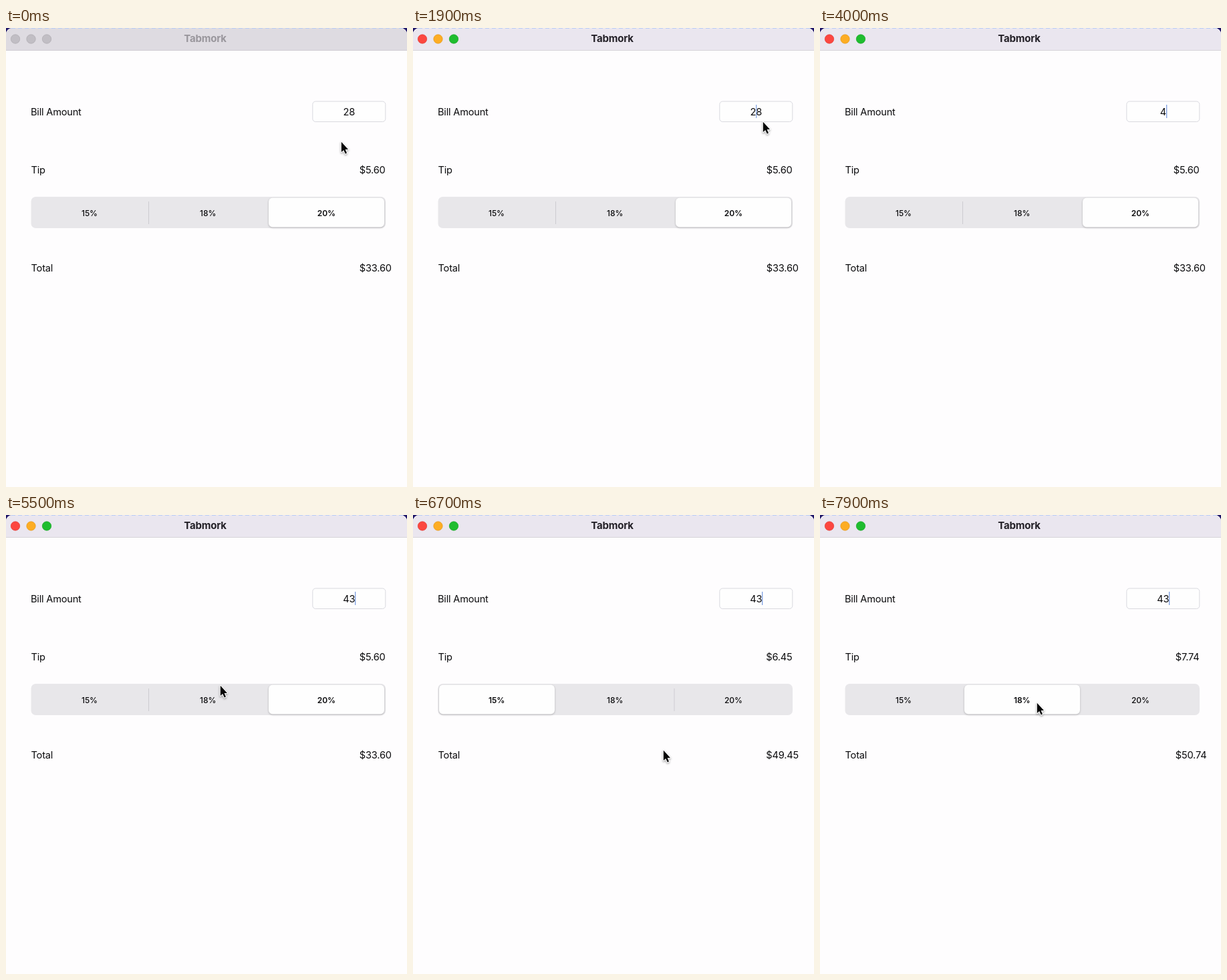
These frames come from a looping animation (600 px wide and 688 px high, 8000 ms). An HTML page with a canvas:

```html
<!DOCTYPE html>
<html lang="en">
<head>
<meta charset="utf-8">
<title>Tip calculator</title>
<style>
  html, body { margin: 0; width: 100%; height: 100%; overflow: hidden; background: #fefdfe; }
  canvas { display: block; width: 600px; height: 688px; }
</style>
</head>
<body>
<canvas id="stage" width="600" height="688"></canvas>
<script>
const ctx = document.getElementById('stage').getContext('2d');
const LOOP = 8000, STEP = 100;
const SANS = 'Inter, "Open Sans", sans-serif';
const RATES = [15, 18, 20];

// time, x, y of the pointer tip
const PATH = [
  [0, 501, 170], [500, 513, 131], [900, 514, 130], [1100, 522, 194], [1400, 523, 140],
  [4800, 523, 140], [5500, 320, 255], [5600, 282, 255], [5900, 142, 288], [6100, 136, 290],
  [6400, 136, 290], [6700, 374, 352], [6900, 374, 352], [7300, 324, 281]
];
// time, text in the field, caret index
const TYPING = [
  [0, '28', -1], [800, '28', 1], [3200, '28', 2], [3400, '2', 1],
  [3600, '', 0], [3900, '4', 1], [4400, '43', 2]
];
// time, bill, chosen segment
const PICKS = [[0, 28, 2], [6000, 43, 0], [7500, 43, 1]];
const ACTIVE_AT = 500, SLIDE = 390;
const HIDE_FROM = 3200, HIDE_TO = 4800;

const clamp = v => Math.max(0, Math.min(1, v));
const smooth = v => { v = clamp(v); return v * v * (3 - 2 * v); };
const mix = (a, b, k) => a + (b - a) * k;
const lastIndex = (list, t) => list.reduce((n, row, i) => row[0] <= t ? i : n, 0);
const money = v => '$' + v.toFixed(2);

function box(x, y, w, h, r, fill) {
  ctx.beginPath();
  ctx.roundRect(x, y, w, h, r);
  if (fill) { ctx.fillStyle = fill; ctx.fill(); }
}

function setFont(size, weight, spacing) {
  ctx.font = `${weight} ${size}px ${SANS}`;
  ctx.letterSpacing = spacing + 'px';
}

function label(text, x, y, align = 'left', color = '#0b0b0d') {
  ctx.textAlign = align;
  ctx.fillStyle = color;
  ctx.fillText(text, x, y);
}

const bodyFont = () => setFont(14.6, 400, -0.2);

function drawWindow(active) {
  ctx.fillStyle = '#1d1568';
  ctx.fillRect(0, 0, 600, 30);
  box(0, 0, 600, 700, 9, '#fefdfe');
  box(0, 0, 600, 33, [9, 9, 0, 0], active ? '#eae6ef' : '#dedbe1');
  ctx.fillStyle = active ? '#d6d3d9' : '#d0cdd3';
  ctx.fillRect(0, 33, 600, 1);

  ctx.fillStyle = '#b9cdf6';
  for (let x = 8; x < 592; x += 10) ctx.fillRect(x, 0, 6, 1);

  const lights = active
    ? [['#fc4740', '#e03a35'], ['#fdad24', '#e2981c'], ['#1fbd2f', '#17a526']]
    : Array(3).fill(['#c1bec4', '#aeabb1']);
  lights.forEach(([fill, rim], i) => {
    ctx.beginPath();
    ctx.arc(14 + i * 23.5, 16.5, 6.7, 0, Math.PI * 2);
    ctx.fillStyle = fill;
    ctx.fill();
    ctx.lineWidth = 0.7;
    ctx.strokeStyle = rim;
    ctx.stroke();
  });
  setFont(15, 700, -0.2);
  label('Tabmork', 298, 21, 'center', active ? '#242128' : '#99969c');
}

function caretAlpha(t) {
  if (t >= 3100 && t < 4650) return 1;
  const start = t < 3100 ? 1900 : 4650;
  if (t < start) return 1;
  const p = (t - start) % 1100;
  return p < 400 ? 1 - smooth((p + 40) / 260) : smooth((p - 370) / 230);
}

function drawField(t) {
  box(458.8, 110, 109, 30.5, 4.5, '#fefefe');
  ctx.lineWidth = 1;
  ctx.strokeStyle = '#d9d9df';
  ctx.stroke();
  const [, text, caret] = TYPING[lastIndex(TYPING, t)];
  bodyFont();
  const left = 513.3 - ctx.measureText(text).width / 2;
  label(text, left, 130.7);
  if (caret < 0) return;
  const x = left + ctx.measureText(text.slice(0, caret)).width;
  ctx.globalAlpha = caretAlpha(t);
  ctx.fillStyle = '#7d9fe0';
  ctx.fillRect(Math.round(x), 115, 1.3, 20);
  ctx.globalAlpha = 1;
}

function drawSegments(t, n) {
  const [at, , to] = PICKS[n];
  const from = n ? PICKS[n - 1][2] : to;
  const k = n ? smooth((t - at) / SLIDE) : 1;
  box(37.5, 253, 530.5, 47, 7, '#e8e7ea');

  [213.5, 391].forEach((x, i) => {
    const shown = s => s === i || s === i + 1 ? 0 : 1;
    ctx.globalAlpha = mix(shown(from), shown(to), k);
    ctx.fillStyle = '#cdccd1';
    ctx.fillRect(x - 0.5, 260, 1, 34);
  });
  ctx.globalAlpha = 1;

  const x = mix(39 + 177 * from, 39 + 177 * to, k);
  ctx.save();
  ctx.shadowColor = 'rgba(0,0,0,.24)';
  ctx.shadowBlur = 3;
  ctx.shadowOffsetY = 1;
  box(x, 254.5, 173, 44, 6, '#fefefe');
  ctx.restore();

  RATES.forEach((rate, i) => {
    const pressed = n && i === to && t - at < 200;
    const bold = i === (k < 0.5 ? from : to);
    setFont(12, bold ? 600 : 500, -0.1);
    label(rate + '%', 125 + 177.2 * i, 281.7, 'center', pressed ? '#59585b' : '#0b0b0d');
  });
}

function drawAmounts(bill, rate) {
  bodyFont();
  label('Bill Amount', 37, 130.7);
  label('Tip', 37.5, 217.7);
  label('Total', 37.5, 364.7);
  const tip = money(bill * rate / 100);
  const left = 567.5 - ctx.measureText(tip).width;
  label(tip, left, 217.7);
  label(money(bill * (1 + rate / 100)), left, 364.7);
}

function drawPointer(t) {
  if (t >= HIDE_FROM && t < HIDE_TO) return;
  const i = lastIndex(PATH, t);
  const a = PATH[i], b = PATH[i + 1] || a;
  const k = a === b ? 0 : (t - a[0]) / (b[0] - a[0]);
  ctx.save();
  ctx.translate(mix(a[1], b[1], k), mix(a[2], b[2], k));
  const arrow = new Path2D('M.8 .8V16L4.2 12.9L6.7 18.6L9 17.6L6.6 12H11Z');
  ctx.lineJoin = 'round';
  ctx.lineWidth = 2.2;
  ctx.strokeStyle = '#fff';
  ctx.shadowColor = 'rgba(0,0,0,.35)';
  ctx.shadowBlur = 3;
  ctx.shadowOffsetY = 1.5;
  ctx.stroke(arrow);
  ctx.shadowColor = 'transparent';
  ctx.fillStyle = '#050505';
  ctx.fill(arrow);
  ctx.restore();
}

function draw(now) {
  const t = Math.floor(now % LOOP / STEP) * STEP;
  const n = lastIndex(PICKS, t);
  const [, bill, choice] = PICKS[n];
  drawWindow(t >= ACTIVE_AT);
  drawAmounts(bill, RATES[choice]);
  drawField(t);
  drawSegments(t, n);
  drawPointer(t);
}

let origin;
function tick(now) {
  origin ??= now;
  draw(now - origin);
  requestAnimationFrame(tick);
}
draw(0);
requestAnimationFrame(tick);
</script>
</body>
</html>
```
